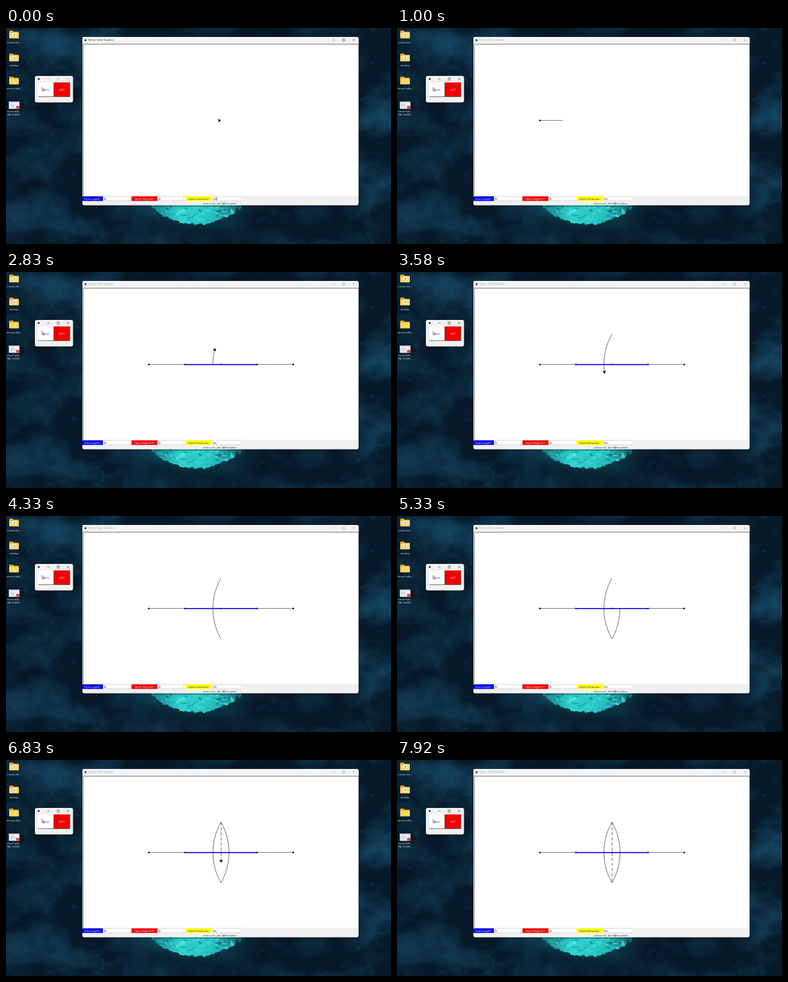
Write an HTML page that moves like this. It is 600 by 338 pixels and loops after 8000 ms.

```html
<!DOCTYPE html>
<html lang="en">
<head>
<meta charset="utf-8">
<title>Convex lens drawing</title>
<style>
  html, body { margin: 0; width: 100%; height: 100%; overflow: hidden; background: #071a2a; }
  svg { position: absolute; inset: 0; width: 100%; height: 100%; }
  #desk { will-change: transform; }
  text { font-family: "Open Sans", "Noto Sans", sans-serif; font-size: 3.75px; fill: #222; }
  .icon text { fill: #e8eef2; text-anchor: middle; }
  .mid { text-anchor: middle; }
  .ctl { fill: none; stroke: currentColor; stroke-width: .55; }
  .ink { fill: none; stroke: #222; stroke-width: .65; }
</style>
</head>
<body>
<svg id="desk" viewBox="0 0 600 338">
  <defs>
    <filter id="cloud" x="0" y="0" width="1" height="1" color-interpolation-filters="sRGB">
      <feTurbulence type="fractalNoise" baseFrequency=".011 .015" numOctaves="5" seed="8"/>
      <feColorMatrix values="0 0 0 0 .09  0 0 0 0 .30  0 0 0 0 .42  2.6 0 0 0 -1.05"/>
    </filter>
    <filter id="veil" x="0" y="0" width="1" height="1" color-interpolation-filters="sRGB">
      <feTurbulence type="turbulence" baseFrequency=".014 .018" numOctaves="4" seed="21"/>
      <feColorMatrix values="0 0 0 0 .15  0 0 0 0 .39  0 0 0 0 .50  -5 0 0 0 .55"/>
    </filter>
    <filter id="rough" x="-.1" y="-.1" width="1.2" height="1.2">
      <feTurbulence type="fractalNoise" baseFrequency=".16" numOctaves="3" seed="4"/>
      <feDisplacementMap in="SourceGraphic" scale="8" xChannelSelector="R" yChannelSelector="G"/>
    </filter>
    <radialGradient id="halo">
      <stop offset=".5" stop-color="#14808c" stop-opacity=".5"/>
      <stop offset="1" stop-color="#0a3445" stop-opacity="0"/>
    </radialGradient>
    <linearGradient id="orb" x1="0" x2="1">
      <stop offset="0" stop-color="#147885"/>
      <stop offset=".35" stop-color="#2fd3d0"/>
      <stop offset=".65" stop-color="#27c3c4"/>
      <stop offset="1" stop-color="#126b7a"/>
    </linearGradient>
    <linearGradient id="shade" x1="0" x2="1">
      <stop offset="0" stop-color="#04121f" stop-opacity=".35"/>
      <stop offset=".2" stop-color="#04121f" stop-opacity=".1"/>
      <stop offset=".55" stop-color="#04121f" stop-opacity=".5"/>
      <stop offset="1" stop-color="#04121f" stop-opacity=".1"/>
    </linearGradient>
  </defs>
  <rect width="600" height="338" fill="#071b2b"/>
  <rect width="600" height="338" filter="url(#cloud)"/>
  <rect width="600" height="338" filter="url(#veil)" opacity=".55"/>
  <rect width="600" height="338" fill="url(#shade)"/>
  <ellipse cx="296" cy="262" rx="115" ry="68" fill="url(#halo)"/>
  <g filter="url(#rough)">
    <path d="M222 272C232 292 266 307 297 307S360 292 370 272Z" fill="url(#orb)"/>
    <g id="splash"></g>
  </g>
  <g id="icons"></g>
</svg>

<svg id="stage" viewBox="0 0 600 338">
  <rect x="117.5" y="15" width="433.5" height="265" rx="4" fill="#000" opacity=".3"/>
  <rect x="119" y="14" width="430.5" height="263.5" rx="3" fill="#f0f0f0"/>
  <path d="M119 24.5V17a3 3 0 0 1 3-3H546.500a3 3 0 0 1 3 3V24.500Z" fill="#f3f3f3"/>
  <rect x="120" y="25" width="429" height="237.500" fill="#fff"/>
  <path d="M120.300 262.500V25.300H549" fill="none" stroke="#555" stroke-width=".8"/>
  <circle cx="124" cy="19" r="1.500" fill="#222"/>
  <text id="title" x="128" y="20.300">Python Turtle Graphics</text>
  <g id="mainCtl"></g>
  <g id="form"></g>
  <text x="307" y="275.700" style="font-size:3.700px">units in cm , Use TAB to switch</text>
  <path id="caret" d="M328.400 264.500v5" stroke="#111" stroke-width=".6"/>

  <rect x="44" y="76" width="62" height="42.500" rx="4" fill="#000" opacity=".3"/>
  <rect x="45" y="75" width="59.500" height="41.500" rx="3" fill="#f0f0f0"/>
  <circle cx="51" cy="79.800" r="1.500" fill="#222"/>
  <g id="toolCtl"></g>
  <rect x="50" y="85.200" width="24.500" height="22.300" fill="#fff"/>
  <rect x="74.500" y="85.200" width="25" height="22.300" fill="#f00000"/>
  <path d="M50 107.500H99.600V85.200M74.400 85.200V107.500" fill="none" stroke="#444" stroke-width=".7"/>
  <text class="mid" x="62.500" y="97.800" style="fill:#22e">Draw</text>
  <text class="mid" x="87" y="97.800" style="fill:#fff">QUIT</text>
  <path d="M56 93v5.300l1.300-1.100 1 2 .9-.4-.9-1.900h1.700Z" fill="#fff" stroke="#111" stroke-width=".5"/>

  <g id="drawing"></g>
  <path id="turtle" d="M0 0L-4.400 2.400L-3.300 0L-4.400 -2.400Z" fill="#000" stroke="#000" stroke-width=".4"/>
  <path id="speck" d="M-1 0H1" stroke="#777" stroke-width=".6"/>
</svg>

<script>
const LOOP = 8000, STEP = 1000 / 12, CLICK = 240;
const CX = 335, CY = 144.7, R = 96.5, BULGE = 12.5, HALF = 47.5;
const OPEN = Math.asin(HALF / R);
const $ = id => document.getElementById(id);

function add(parent, tag, attrs, text) {
  const el = document.createElementNS(parent.namespaceURI, tag);
  for (const k in attrs) el.setAttribute(k, attrs[k]);
  if (text) el.textContent = text;
  parent.append(el);
  return el;
}

function random(seed) {
  return () => (seed = (seed * 16807) % 2147483647) / 2147483647;
}

function buildDesktop() {
  const rnd = random(77);
  for (let i = 0; i < 70; i++) {
    const x = 228 + rnd() * 136;
    const depth = 32 * (1 - ((x - 296) / 76) ** 2);
    add($("splash"), "ellipse", {
      cx: x, cy: 276 + rnd() * depth, rx: 1 + rnd() * 5, ry: .4 + rnd() * 1.3,
      fill: rnd() < .55 ? "#5af0e4" : "#0d5d6c", opacity: .3 + rnd() * .5
    });
  }
  const folder = (y, label, paper) => {
    const g = add($("icons"), "g", { class: "icon", transform: `translate(12.5 ${y})` });
    add(g, "path", { d: "M-7.500 -5.500a1 1 0 0 1 1-1H-2L0 -4.800H6.500a1 1 0 0 1 1 1V5H-7.500Z", fill: "#e2a324" });
    add(g, "rect", { x: -7.5, y: -3.6, width: 15, height: 9.4, rx: 1, fill: "#ffd766" });
    if (paper) {
      add(g, "rect", { x: -2.5, y: -3, width: 5.5, height: 5.5, fill: "#f2f2ee" });
      add(g, "circle", { cx: .4, cy: .2, r: 1.4, fill: "#7fa9c9" });
    }
    add(g, "text", { x: 0, y: 13.7 }, label);
  };
  folder(10.5, "convex-len...", true);
  folder(46.5, "desktop", true);
  folder(82.5, "ubuntu-sha...", false);

  const g = add($("icons"), "g", { class: "icon" });
  add(g, "rect", { x: 4.5, y: 115, width: 16.5, height: 11.5, fill: "#f1f3f5" });
  add(g, "rect", { x: 4.5, y: 115, width: 16.5, height: 2, fill: "#c3ccd3" });
  add(g, "path", { d: "M6.500 119.500h7M6.500 121.500h9M6.500 123.500h6", stroke: "#9aa7b0", "stroke-width": .6 });
  add(g, "circle", { cx: 18.3, cy: 124.2, r: 2.7, fill: "#dd4b3e" });
  add(g, "text", { x: 12.5, y: 131.8 }, "slate01426...");
  add(g, "text", { x: 12.5, y: 137 }, "PAT (COMP...");
}

function buildWindows() {
  const controls = (id, x, y, gap) => add($(id), "path", {
    class: "ctl",
    d: `M${x - 1.7} ${y}h3.400M${x + gap - 1.6} ${y - 1.6}h3.200v3.200h-3.200Z` +
       `M${x + 2 * gap - 1.6} ${y - 1.6}l3.200 3.200m0 -3.200l-3.200 3.200`
  });
  controls("mainCtl", 510.5, 18.8, 15.7);
  controls("toolCtl", 66, 79.8, 15.4);

  const field = (x, w, end, color, ink, label, value) => {
    const f = $("form");
    add(f, "rect", { x, y: 263.4, width: w, height: 7.2, fill: color });
    add(f, "text", { class: "mid", x: x + w / 2, y: 268.5, style: `fill:${ink};font-size:3.700px` }, label);
    add(f, "rect", { x: x + w, y: 263.4, width: end - x - w, height: 7, fill: "#fff" });
    add(f, "path", { d: `M${x + w} 263.600H${end}M${x + w} 270.400H${end}`, stroke: "#aaa", "stroke-width": .4 });
    add(f, "text", { x: x + w + 1, y: 268.5 }, value);
  };
  field(118.8, 32.4, 195.5, "#0000e8", "#fff", "Focal Length(f) :", "80");
  field(195.5, 40.5, 280, "#ee0000", "#fff", "Object Height(h1):", "40");
  field(280, 41, 366, "#ffff00", "#222", "Object Distance(u) :", "300");
}

// Each path maps progress 0..1 to a point.
const line = (x0, y0, x1, y1) => p => [x0 + (x1 - x0) * p, y0 + (y1 - y0) * p];
const arc = (side, from, to) => p => {
  const a = (from + (to - from) * p) * OPEN;
  return [CX + side * (BULGE - R + R * Math.cos(a)), CY - R * Math.sin(a)];
};
const flat = (x0, x1) => line(x0, CY, x1, CY);
const leg = (t0, t1, path, look, ink) => ({ t0, t1, path, look, ink });

const black = {}, blue = { stroke: "#0000f0", style: "stroke:#0000f0;stroke-width:1.600" };
const dashed = { "stroke-dasharray": "4.800 3.200" };
const LEFT = CX - BULGE, RIGHT = CX + BULGE, TOP = CY - HALF, LOW = CY + HALF;

const legs = [
  leg(380, 850, flat(CX, 222.5), "arrow"),
  leg(850, 1800, flat(222.5, 447.7), "none", black),
  leg(1800, 2020, flat(447.7, 391.3), "arrow"),
  leg(2020, 2440, flat(391.3, 278.8), "none", blue),
  leg(2440, 2610, flat(278.8, LEFT), "arrow"),
  leg(2610, 3040, arc(-1, 0, 1), "turn", black),
  leg(3040, 3460, arc(-1, 1, 0), "speck"),
  leg(3460, 3890, arc(-1, 0, -1), "turn", black),
  leg(3890, 4340, arc(-1, -1, 0), "speck"),
  leg(4340, 4440, flat(LEFT, RIGHT), "speck"),
  leg(4440, 4880, arc(1, 0, -1), "turn", black),
  leg(4880, 5370, line(CX, LOW, RIGHT - 3, CY + 1), "speck"),
  leg(5370, 5820, arc(1, 0, 1), "turn", black),
  leg(5820, 7340, line(CX + .3, TOP, CX + .3, LOW), "turn", dashed),
  leg(7340, 7560, line(CX, LOW, CX, CY), "arrow"),
  leg(7560, 7860, flat(CX, 391.3), "arrow")
];

const dots = [
  [222.5, 850, 1.3, "#000"], [447.7, 1800, 1.3, "#000"],
  [391.3, 2020, 1.2, "#0000c8"], [278.8, 2440, 1.2, "#0000c8"], [CX, 2230, 1.15, "#0000e0"]
];

function buildDrawing() {
  for (const l of legs)
    if (l.ink) l.el = add($("drawing"), "path", { class: "ink", ...l.ink });
  for (const d of dots)
    d.el = add($("drawing"), "circle", { cx: d[0], cy: CY, r: d[2], fill: d[3] });
}

const show = (el, on) => el.setAttribute("visibility", on ? "visible" : "hidden");

function trace(path, p) {
  const n = 16;
  return "M" + Array.from({ length: n + 1 }, (_, i) =>
    path(p * i / n).map(v => v.toFixed(2)).join(" ")).join("L");
}

function draw(t) {
  const clicked = t >= CLICK;
  $("title").style.fill = clicked ? "#999" : "#222";
  $("mainCtl").style.color = clicked ? "#999" : "#222";
  $("toolCtl").style.color = clicked ? "#222" : "#aaa";
  show($("caret"), !clicked);

  let look = t < legs[0].t0 ? "arrow" : "none", pos = [CX, CY], angle = 0;
  for (const l of legs) {
    const p = Math.min(1, Math.max(0, (t - l.t0) / (l.t1 - l.t0)));
    if (l.el) {
      show(l.el, p > 0);
      l.el.setAttribute("d", trace(l.path, p));
    }
    if (t >= l.t0 && t < l.t1) {
      look = l.look;
      pos = l.path(p);
      if (look === "turn") {
        const [x, y] = l.path(p + .01);
        angle = Math.atan2(y - pos[1], x - pos[0]) * 180 / Math.PI;
      }
    }
  }
  for (const d of dots) show(d.el, t >= d[1]);

  const place = `translate(${pos[0]} ${pos[1]})`;
  $("turtle").setAttribute("transform", `${place} rotate(${angle})`);
  $("speck").setAttribute("transform", place);
  show($("turtle"), look === "arrow" || look === "turn");
  show($("speck"), look === "speck");
}

buildDesktop();
buildWindows();
buildDrawing();

const start = performance.now();
function tick() {
  const t = (performance.now() - start) % LOOP;
  draw(Math.floor((t + 4) / STEP) * STEP % LOOP);
  requestAnimationFrame(tick);
}
tick();
</script>
</body>
</html>
```
